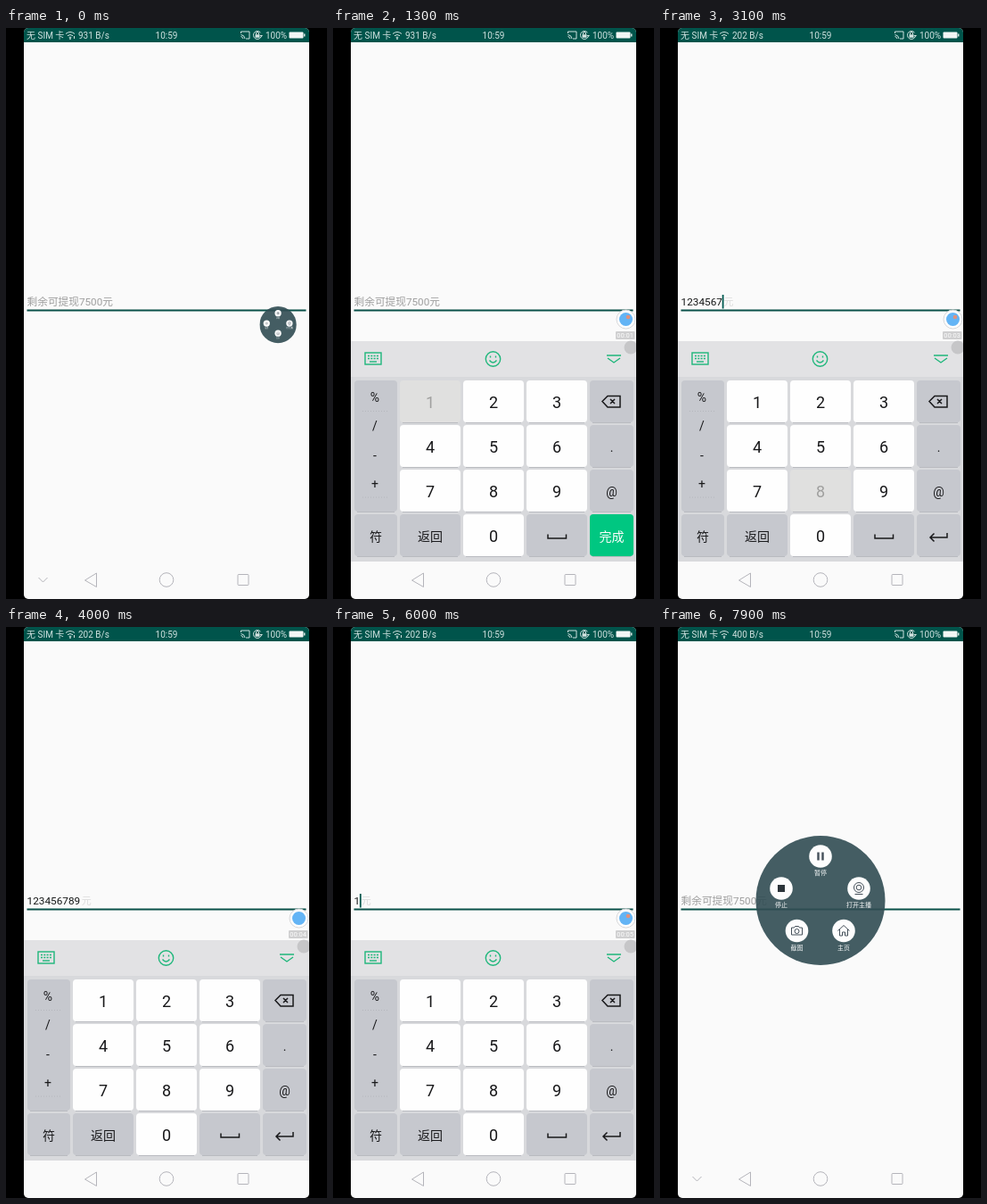
These frames come from a looping animation (360x640 px, 8 s). An HTML page:

```html
<!DOCTYPE html>
<html lang="zh-CN">
<head>
<meta charset="utf-8">
<title>Amount input</title>
<style>
html, body { margin: 0; width: 100%; height: 100%; overflow: hidden; background: #000; }
svg { display: block; width: 360px; height: 640px; font-family: Roboto, "Noto Sans CJK SC", "Noto Sans CJK", sans-serif; }
.mid { text-anchor: middle; }
.line { fill: none; stroke-width: 1; }
.status { font-size: 10px; fill: #d2e2e0; }
.status .line { stroke: #d2e2e0; }
.nav { stroke: #b4b4ba; }
.key rect { fill: #fefefe; }
.key.side rect { fill: #c6c8ce; }
.key text { font-size: 18px; fill: #18181a; text-anchor: middle; }
.key.side text { font-size: 14px; }
.key .line { stroke: #18181a; stroke-width: 1.5; }
.key.down rect { fill: #e0e0df; }
.key.side.down rect { fill: #b2b4ba; }
.key.down text { fill: #a0a09f; }
.tool { stroke: #1fb77b; stroke-width: 1.4; }
.item circle.disc { fill: #fdfdfd; }
.item .line { stroke: #45505a; }
.item text { font-size: 7px; fill: #f6f8f8; text-anchor: middle; }

#board { animation: board 8s infinite; }
#chevron { animation: chevron 8s infinite step-end; }
#dock { animation: dock 8s infinite step-end; }
#small { animation: close 8s infinite; }
#large { animation: open 8s infinite; }
@keyframes board {
  0%, 10% { transform: translateY(248px); animation-timing-function: cubic-bezier(0, .6, .2, 1); }
  13.75%, 83.6% { transform: none; animation-timing-function: cubic-bezier(.5, 0, .9, .5); }
  87.5%, 100% { transform: translateY(248px); }
}
@keyframes chevron {
  0% { visibility: visible; }
  10% { visibility: hidden; }
  94% { visibility: visible; }
}
@keyframes dock {
  0% { visibility: hidden; }
  2.4% { visibility: visible; }
  92.4% { visibility: hidden; }
}
@keyframes close {
  0% { transform: translate(305px, 332.5px) scale(.285); opacity: 1; }
  2% { transform: translate(337.5px, 339px) scale(.1); opacity: 1; }
  2.4%, 100% { transform: translate(337.5px, 339px) scale(.1); opacity: 0; }
}
@keyframes open {
  0%, 92.3% { transform: translate(337.5px, 339px) scale(.1); opacity: 0; }
  92.4% { transform: translate(337.5px, 339px) scale(.1); opacity: 1; animation-timing-function: ease-out; }
  98.4%, 100% { transform: translate(180px, 306.5px) scale(1); opacity: 1; }
}
</style>
</head>
<body>
<svg viewBox="0 0 360 640">
  <defs>
    <clipPath id="screen"><rect x="20" width="320" height="640" rx="5"/></clipPath>
    <clipPath id="boardArea"><rect x="20" y="16" width="320" height="581.5"/></clipPath>
  </defs>
  <rect width="360" height="640"/>
  <g clip-path="url(#screen)">
    <rect x="20" width="320" height="640" fill="#fafafa"/>

    <g class="status">
      <rect x="20" width="320" height="16" fill="#00544b"/>
      <text x="23" y="12">无 SIM 卡</text>
      <path class="line" d="M67 6.5q5-4 10 0M69 8.7q3-2.4 6 0M70.7 10.6q1.3-1 2.6 0" stroke-width="1.3"/>
      <circle cx="72" cy="12" r=".9"/>
      <path id="traffic" class="line" d="M76.500 9v3"/>
      <text id="speed" x="81" y="12"></text>
      <text class="mid" x="180" y="12">10:59</text>
      <path class="line" d="M263.500 6V4H273V12H269M263.500 7.500q4 .5 4.500 4.500M263.500 9.500q2 .5 2.500 2.500"/>
      <path class="line" d="M285.500 5.200A4.500 4.500 0 1 0 286 10M280.500 7.500V6a1.500 1.500 0 0 1 3 0V7.500"/>
      <rect x="279.500" y="7.300" width="5" height="3.500"/>
      <path d="M284.500 8h3.500l-1.700 2.300z"/>
      <text x="291" y="12">100%</text>
      <rect x="317.500" y="4.500" width="16" height="7" rx="1" fill="#f2f6f5"/>
      <rect x="334" y="6.500" width="1.500" height="3"/>
    </g>

    <g font-size="11.700">
      <text id="hint" x="23.500" y="311" fill="#9f9f9f">剩余可提现7500元</text>
      <text id="amount" x="23.500" y="311" fill="#161818" font-size="11.800"></text>
      <text id="unit" y="311" fill="#dcdcdc" font-size="11">元</text>
    </g>
    <rect id="caret" y="299" width="1.800" height="15.500" fill="#005a50"/>
    <rect x="23.500" y="315.500" width="313" height="2" fill="#0a5049"/>

    <g clip-path="url(#boardArea)">
      <g id="board">
        <rect x="20" y="351" width="320" height="40" fill="#e2e2e4"/>
        <rect x="20" y="391" width="320" height="207" fill="#d8d9dc"/>
        <g class="line tool">
          <rect x="36" y="364" width="18" height="13"/>
          <path d="M39 367.500h12M39 370.500h12" stroke-dasharray="2 1.300"/>
          <path d="M41 374h8"/>
          <circle cx="179.500" cy="371" r="8.200"/>
          <path d="M175.500 372.500q4 5 8 0M176.500 367.500v2M182.500 367.500v2M307 367h16M308 370l7 5 7-5"/>
        </g>
        <g id="keys"></g>
        <path class="line" d="M33 429.500h28M33 526h28" stroke="#b4b6bc" stroke-dasharray="1 2"/>
        <circle cx="334" cy="358" r="7.500" fill="#c6c6c8"/>
      </g>
    </g>

    <g class="line nav">
      <path id="chevron" d="M36.500 616l5 5 5-5"/>
      <path d="M101.500 611v15.500L88.500 619z" stroke-linejoin="round"/>
      <circle cx="180" cy="618.500" r="7.800"/>
      <rect x="260" y="612.500" width="12" height="12" rx=".7"/>
    </g>

    <g id="dock">
      <circle cx="328.500" cy="326.500" r="10.500" fill="#fdfdfd" stroke="#d6d6d8"/>
      <circle cx="328.500" cy="326.500" r="7.500" fill="#63b4f5"/>
      <circle id="lamp" cx="331" cy="324" r="2.300" fill="#e0917c"/>
      <rect x="317" y="340" width="21.500" height="9" rx="1" fill="#cfcfd0"/>
      <text id="clock" class="mid" x="327.700" y="347.200" font-size="7.500" fill="#fdfdfd"></text>
    </g>
    <g id="small"></g>
    <g id="large"></g>
  </g>
</svg>
<script>
const $ = id => document.getElementById(id);

// Keyboard
const cols = [[24, 48], [75, 68], [146, 68], [217, 68], [288, 49]];
const rows = [395, 445, 495, 545];
const icons = {
  erase: '<path class="line" d="M302 418.500l6-6h14v12.500h-14zM311 416l5 5M316 416l-5 5"/>',
  space: '<path class="line" d="M241 567.500v4.500h20.500v-4.500" stroke-width="2"/>',
  enter: '<path class="line" d="M322 566v5h-19M307.500 566.500l-4.500 4.500 4.500 4.500"/>'
};

function key(id, col, row, body, side, height = 47) {
  const [x, w] = cols[col], y = rows[row];
  const text = `<text x="${x + w / 2}" y="${y + (side ? 30 : 31)}">${body}</text>`;
  return `<g id="${id}" class="key ${side ? 'side' : ''}">
    <path d="M${x + 3} ${y + height + .3}h${w - 6}" stroke="#b9bbc0" stroke-width="1.500"/>
    <rect x="${x}" y="${y}" width="${w}" height="${height}" rx="4"/>${icons[body] || text}</g>`;
}

let board = key('signs', 0, 0, '', true, 147);
for (let d = 1; d < 10; d++) board += key('k' + d, 1 + (d - 1) % 3, Math.floor((d - 1) / 3), d);
board += key('k0', 2, 3, 0);
board += key('symbols', 0, 3, '符', true) + key('back', 1, 3, '返回', true);
board += key('space', 3, 3, 'space', true) + key('erase', 4, 0, 'erase', true);
board += key('dot', 4, 1, '.', true) + key('at', 4, 2, '@', true);
board += key('enter', 4, 3, 'enter', true);
board += `<g id="done"><rect x="288" y="545" width="49" height="47" rx="4" fill="#00c781"/>
  <text class="mid" x="312.500" y="575" font-size="14" fill="#fcfefd">完成</text></g>`;
[...'%/-+'].forEach((c, i) => {
  board += `<text class="mid" x="47" y="${419 + i * 32.3}" font-size="14" fill="#18181a">${c}</text>`;
});
$('keys').innerHTML = board;

// Round menus
const glyphs = {
  pause: '<path class="line" d="M-2.500-4.500v9M2.500-4.500v9" style="stroke-width:2.400"/>',
  stop: '<rect x="-4" y="-4" width="8" height="8" fill="#2c343a"/>',
  record: '<circle r="5" class="line"/><circle r="2.500" fill="#45505a"/>',
  camera: '<path class="line" d="M-6-3.500h3l1-1.500h4l1 1.500h3v8h-12z"/><circle class="line" cy=".5" r="2.500"/>',
  home: '<path class="line" d="M-6.500 0L0-6 6.500 0M-4.500-1.500V5.500h3V1.500h3v4h3V-1.500"/>',
  webcam: '<circle class="line" r="5.500" cy="-1"/><circle class="line" r="2.800" cy="-1"/><path class="line" d="M-4.500 6.500h9"/>',
  gear: '<circle class="line" r="4.500" stroke-dasharray="2 1"/><circle class="line" r="2"/>'
};

const menu = items => '<circle r="72.500" fill="#324e54" fill-opacity=".91"/>' + items.map(([x, y, icon, label]) =>
  `<g class="item" transform="translate(${x} ${y})"><circle class="disc" r="12.800"/>${glyphs[icon]}<text y="21">${label}</text></g>`).join('');

$('small').innerHTML = menu([
  [0, -45, 'record', '录制'], [-45, -5, 'gear', '设置'],
  [45, -5, 'webcam', '打开主播'], [0, 34, 'home', '主页']
]);
$('large').innerHTML = menu([
  [0, -49.5, 'pause', '暂停'], [-44, -13.5, 'stop', '停止'],
  [43, -13.5, 'webcam', '打开主播'], [-26.5, 34, 'camera', '截图'], [26, 34, 'home', '主页']
]);

// Typing, erasing and status readouts
const LOOP = 8000, DIGIT = 6.63, DIGITS = '123456789';
const typed = [...DIGITS].map((_, i) => 1440 + i * 257);
const erased = [4400, 4650, 4870, 5100, 5350, 5500, 5600, 5700, 6400];
const trafficFlips = [700, 1700, 2700, 3500, 4700, 5500, 6400, 7000, 7500];
const edits = [...typed, ...erased];
const show = (id, on) => $(id).style.display = on ? '' : 'none';
const press = (id, on) => $(id).classList.toggle('down', on);
const put = (id, text) => { if ($(id).textContent !== text) $(id).textContent = text; };

function draw(t) {
  const past = list => list.filter(at => t >= at);
  const count = past(typed).length - past(erased).length;
  const last = past(edits).pop() || 0;
  const end = 23.5 + count * DIGIT;

  put('amount', DIGITS.slice(0, count));
  show('hint', !count);
  show('unit', count);
  show('caret', count && Math.floor((t - last) / 500) % 2 === 0);
  $('unit').setAttribute('x', end + 1.5);
  $('caret').setAttribute('x', end - .2);

  typed.forEach((at, i) => press('k' + (i + 1), t >= at - 150 && t < at));
  press('erase', erased.some(at => t >= at - 100 && t < at));
  show('done', t < typed[0]);

  const secs = Math.floor((t + 400) / 1100);
  put('clock', '00:0' + secs);
  show('lamp', secs % 2);
  put('speed', (t < 2200 ? 931 : t < 6700 ? 202 : 400) + ' B/s');
  show('traffic', past(trafficFlips).length % 2 === 0);
}

let start;
function tick(now) {
  start ??= now;
  draw((now - start) % LOOP);
  requestAnimationFrame(tick);
}
draw(0);
requestAnimationFrame(tick);
</script>
</body>
</html>
```
